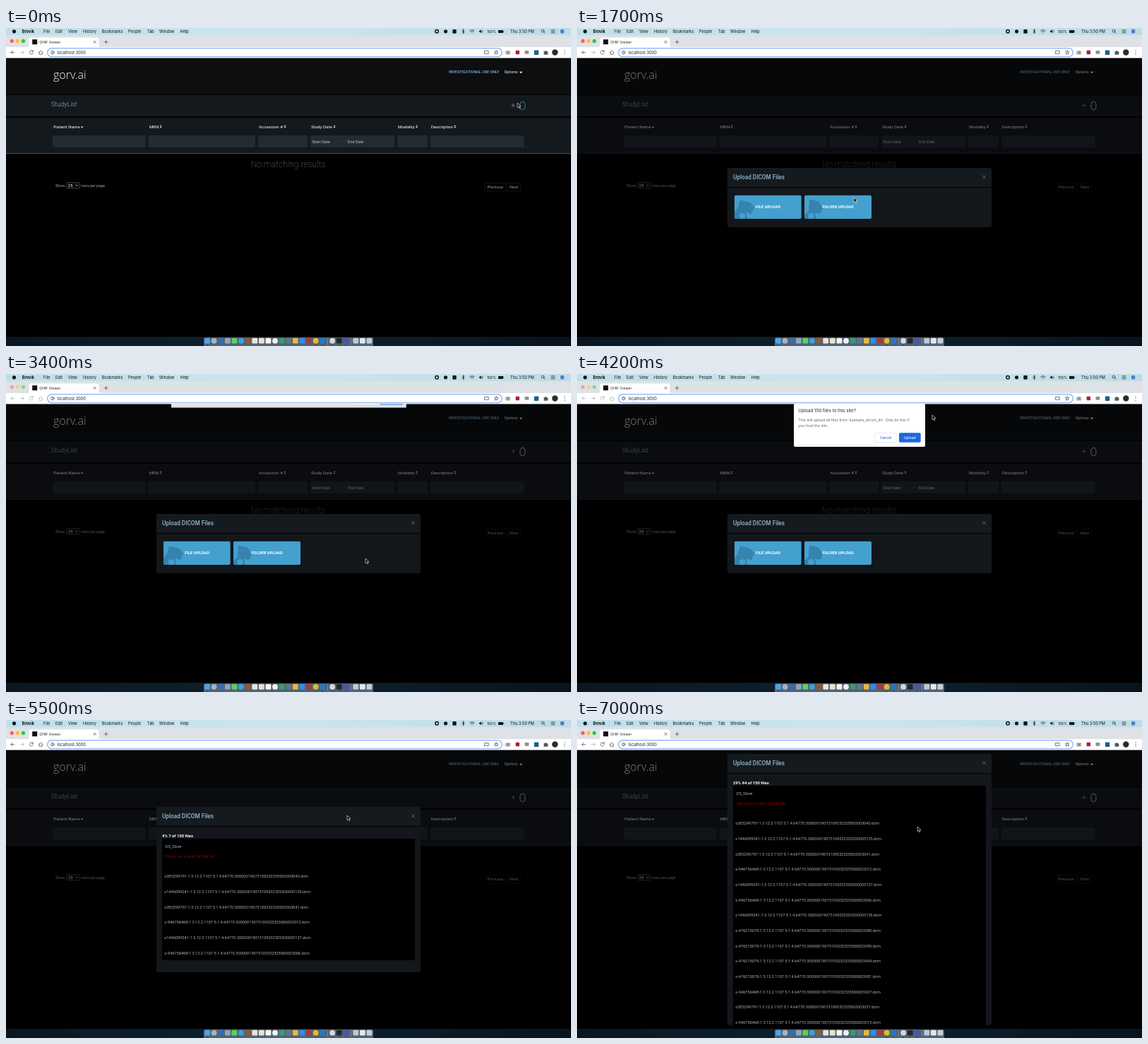
These frames come from a looping animation (800x450 px, 7100 ms). An HTML page:

```html
<!DOCTYPE html>
<html lang="en">
<head>
<meta charset="utf-8">
<title>Study upload</title>
<style>
html, body { margin: 0; width: 100%; height: 100%; overflow: hidden; background: #000; }
svg { display: block; }
#stage { width: 800px; height: 450px; }
text { font-family: Roboto, sans-serif; font-size: 6.2px; fill: #fff; white-space: pre; }
.mac text { font-family: Inter, sans-serif; font-size: 5.3px; fill: #222; }
.mac .menu text { font-size: 5.6px; fill: #111; }
.mac .side { font-weight: 600; font-size: 4.8px; fill: #77777b; }
.mac .faint text { font-size: 5.2px; fill: #b4b4b4; }
.mid { text-anchor: middle; }
.line { fill: none; stroke-linecap: round; stroke-linejoin: round; }

#dim, #modal, .pre, .post, .busy, #sheet, #ask, #cursor, #arrow, #resize {
  animation: 7.1s linear infinite;
}
#dim, #modal { animation-name: fade; }
.pre { animation-name: before; animation-timing-function: step-end; }
.post { animation-name: after; animation-timing-function: step-end; }
.busy { animation-name: busy; animation-timing-function: step-end; }
#sheet { animation-name: slide; }
#ask { animation-name: ask; animation-timing-function: step-end; }
#cursor { animation-name: move; animation-timing-function: ease-in-out; }
#arrow { animation-name: arrow; animation-timing-function: step-end; }
#resize { animation-name: resize; animation-timing-function: step-end; }

@keyframes fade { 0%, 7.04% { opacity: 0 } 8.45%, 100% { opacity: 1 } }
@keyframes before { 0% { opacity: 1 } 7.04%, 100% { opacity: 0 } }
@keyframes after { 0% { opacity: 0 } 7.04%, 100% { opacity: 1 } }
@keyframes busy { 0% { opacity: 1 } 28.17% { opacity: .45 } 64.79%, 100% { opacity: 1 } }
@keyframes slide {
  0%, 28.17% { transform: translateY(-190px); animation-timing-function: ease-out }
  32.4%, 45.07% { transform: none }
  48.06%, 100% { transform: translateY(-190px) }
}
@keyframes ask { 0% { opacity: 0 } 53.5% { opacity: 1 } 64.79%, 100% { opacity: 0 } }
@keyframes move {
  0%, 1.4% { transform: translate(724px, 106px) }
  4%, 8.5% { transform: translate(718px, 109px) }
  21.1%, 28.2% { transform: translate(392px, 240px) }
  36.6%, 38.8% { transform: translate(566px, 226px) }
  42.5%, 45.07% { transform: translate(545px, 219px) }
  47.89%, 51.5% { transform: translate(509px, 261px) }
  57.5%, 59.3% { transform: translate(503px, 58px) }
  62.7%, 65.5% { transform: translate(473px, 89px) }
  73.2%, 77.5% { transform: translate(483px, 135px) }
  84%, 100% { transform: translate(482px, 151px) }
}
@keyframes arrow { 0% { opacity: 1 } 36.5% { opacity: 0 } 39%, 100% { opacity: 1 } }
@keyframes resize { 0% { opacity: 0 } 36.5% { opacity: 1 } 39%, 100% { opacity: 0 } }
</style>
</head>
<body>
<svg id="stage" viewBox="0 0 800 450">
  <defs>
    <linearGradient id="sky"><stop stop-color="#bfdfea"/><stop offset=".5" stop-color="#cbe5ee"/><stop offset="1" stop-color="#bedce8"/></linearGradient>
    <linearGradient id="sea"><stop stop-color="#0a1722"/><stop offset=".5" stop-color="#0d2231"/><stop offset="1" stop-color="#08141d"/></linearGradient>
    <path id="sort" d="M-1.5 -.4L0 -2.1L1.5 -.4ZM-1.5 .4L0 2.1L1.5 .4Z" fill="#fff"/>
    <clipPath id="tile"><rect width="95" height="33.5" rx="2.5"/></clipPath>
  </defs>

  <rect width="800" height="450"/>

  <g id="page">
    <rect y="42" width="800" height="52" fill="#0c0e10"/>
    <rect y="95" width="800" height="30" fill="#14191e"/>
    <rect y="127" width="800" height="50" fill="#14191e"/>
    <rect y="177" width="800" height="1" fill="#112a3c"/>
    <rect class="pre" y="177" width="800" height="1" fill="#28567f"/>
    <text x="67" y="72" style="font: 300 16px 'Open Sans', sans-serif">gorv.ai</text>
    <text x="627" y="64.3" style="font-size:5.4px;font-weight:500;fill:#84b4d8">INVESTIGATIONAL USE ONLY</text>
    <text x="705.5" y="64.3" style="font-size:5.5px">Options</text>
    <path d="M727 61.8h4.4l-2.2 2.5z" fill="#fff"/>
    <text x="64" y="111" style="font-size:9px;font-weight:300;fill:#9bb2be">StudyList</text>
    <path d="M715.7 109.5h5M718.2 107v5" class="line" stroke="#8b969d" stroke-width=".7"/>
    <g class="line" stroke-width=".9">
      <rect class="pre" x="727.9" y="104.3" width="7" height="11.4" rx="3.5" stroke="#3d86a8"/>
      <rect class="post" x="727.9" y="104.3" width="7" height="11.4" rx="3.5" stroke="#bcc3c7"/>
    </g>
    <g id="filters"></g>
    <path class="pre" d="M106 139.4h3.4l-1.7 2z" fill="#fff"/>
    <path class="post" d="M106 141h3.4l-1.7-2z" fill="#fff"/>
    <text x="433.5" y="162.5" style="font-size:5.6px;fill:#c5cbd0">Start Date</text>
    <text x="484" y="162.5" style="font-size:5.6px;fill:#c5cbd0">End Date</text>
    <path d="M473 160.5h8" stroke="#39434b" stroke-width=".6"/>
    <text x="399.5" y="197" class="mid" style="font-size:12.1px;font-weight:200;fill:#858585">No matching results</text>
    <text x="70" y="225" style="font-size:5.5px;fill:#a3a3a3">Show</text>
    <rect x="86" y="218.8" width="18" height="8" rx="1" fill="#050505" stroke="#888" stroke-width=".5"/>
    <text x="88" y="225" style="font-size:5.8px">25</text>
    <path d="M98.5 222l1.5 1.6 1.5-1.6" class="line" stroke="#fff" stroke-width=".7"/>
    <text x="106" y="225" style="font-size:5.4px;fill:#a3a3a3">rows per page</text>
    <path d="M678.5 219.5h29.5v11.5h-29.5zM710 219.5h18.5v11.5H710z" class="line" stroke="#1d1d1d" stroke-width=".6"/>
    <text x="692.8" y="227.3" class="mid" style="font-size:5.9px;fill:#999">Previous</text>
    <text x="719.2" y="227.3" class="mid" style="font-size:5.9px;fill:#999">Next</text>
  </g>

  <rect id="dim" y="42" width="800" height="395" fill-opacity=".5"/>

  <g id="modal">
    <rect id="panel" x="213" width="374" rx="3" fill="#13171b"/>
    <g id="head">
      <path d="M213 27V3q0-3 3-3h368q3 0 3 3v24z" fill="#151a1f"/>
      <path d="M213 27.4h374" stroke="#020303"/>
      <text x="221" y="16.2" style="font-size:8.2px;font-weight:500;fill:#91b9cd">Upload DICOM Files</text>
      <path d="M574.4 10.8l4.2 4.2m0-4.2l-4.2 4.2" class="line" stroke="#8b959c" stroke-width=".6"/>
    </g>
    <g id="choose">
      <g transform="translate(222.8 236.6)" clip-path="url(#tile)">
        <rect width="95" height="33.5" fill="#44a0cf"/>
        <path d="M8 7L22 10L28 17L24 27L17 24L18 34H0V24L5 18Z" fill="#3583ae"/>
        <path d="M7 27l5-2 4 3-2 6h-6z" fill="#44a0cf"/>
      </g>
      <g transform="translate(322 236.6)" clip-path="url(#tile)">
        <rect width="95" height="33.5" fill="#44a0cf"/>
        <path d="M7 6L20 9L26 18L23 26L15 25L17 34H0V28L6 22Z" fill="#3583ae"/>
        <path d="M5 27l5-2 4 3-2 6h-6z" fill="#44a0cf"/>
      </g>
      <text x="270.5" y="255.4" class="mid" style="font-size:5.8px;font-weight:700">FILE UPLOAD</text>
      <text x="369.5" y="255.4" class="mid" style="font-size:5.8px;font-weight:700">FOLDER UPLOAD</text>
    </g>
    <g id="progress">
      <text id="count" x="221" y="43" style="font-size:5.9px;font-weight:700"></text>
      <svg id="list" x="221" y="45" width="358" height="0"><rect width="358" height="400"/></svg>
    </g>
  </g>

  <g id="sheet" class="mac">
    <rect x="234" y="42" width="332.5" height="185.3" fill="#e2e2e2"/>
    <rect x="234" y="58" width="64" height="152" fill="#cdcdcf"/>
    <rect x="299" y="58" width="267.5" height="152" fill="#fff"/>
    <path d="M234 58h332.5M234 210.3h332.5" stroke="#bcbcbc" stroke-width=".6"/>
    <path d="M378.7 58v152M463.5 58v152M469.5 58v152M549 58v152M554.5 58v152" stroke="#e3e3e3" stroke-width=".6"/>
    <rect x="379.4" y="59.5" width="3.4" height="34" rx="1.7" fill="#bdbdbd"/>
    <rect x="293.6" y="59.5" width="3.4" height="124" rx="1.7" fill="#939397"/>
    <g fill="#f8f8f8" stroke="#c4c4c4" stroke-width=".5">
      <path d="M238.5 44.5h21v9.5h-21zM263 44.5h19v9.5h-19zM284 44.5h18v9.5h-18zM357 44.5h87v9.5h-87zM471 44.5h91.5v9.5H471z"/>
    </g>
    <path d="M249 44.5v9.5" stroke="#ddd" stroke-width=".5"/>
    <path d="M244.5 47l-2 2.3 2 2.3M253.5 47l2 2.3-2 2.3M266 47.2h7v4.2h-7zM268.3 47.2v4.2M270.6 47.2v4.2M276 48.6l1.3 1.4 1.3-1.4M289.5 47h3l1 1h3v3.8h-7zM438 48.4l1.5-1.7 1.5 1.7M438 50.2l1.5 1.7 1.5-1.7" class="line" stroke="#666" stroke-width=".7"/>
    <circle cx="475.7" cy="48.7" r="1.7" class="line" stroke="#777" stroke-width=".6"/><path d="M477 50l1.3 1.5" stroke="#777" stroke-width=".6"/>
    <path d="M360 46.4h2.5l.8 1h3.5v4.8H360zM301.5 69.6h2.5l.8 1h3.5v4.8h-6.8z" fill="#5cb8ec"/>
    <text x="368.3" y="51.5">example_dicom_dir</text>
    <text x="480.5" y="51.5" style="fill:#8c8c8c">Search</text>
    <text x="301" y="65" style="font-size:4.8px;font-weight:500">Today</text>
    <text x="309.5" y="74.3">untitled folder</text>
    <path d="M374.5 70.5l2.6 1.8-2.6 1.8z" fill="#555"/>
    <path d="M299 67.2h79M299 78h79" stroke="#e6e6e6" stroke-width=".4"/>
    <text x="301" y="84.3" style="font-size:4.8px;font-weight:500">2019</text>
    <g id="files" class="faint"></g>
    <g id="side"></g>
    <rect x="234" y="210.6" width="332.5" height="16.7" fill="#e2e2e2"/>
    <rect x="493" y="214.5" width="32.5" height="9" rx="1.8" fill="#fff" stroke="#c0c0c0" stroke-width=".5"/>
    <rect x="529" y="214.5" width="33.5" height="9" rx="1.8" fill="#2674f2"/>
    <text x="509.2" y="220.9" class="mid">Cancel</text>
    <text x="545.7" y="220.9" class="mid" style="fill:#fff">Upload</text>
  </g>

  <g id="browser" class="mac">
    <rect width="800" height="10.5" fill="url(#sky)"/>
    <rect y="10" width="800" height="17.5" fill="#dee1e6"/>
    <rect y="27" width="800" height="15.5" fill="#fff"/>
    <path d="M30 27q2.5 0 2.5-3v-7.5q0-3 3-3h93q3 0 3 3V24q0 3 2.5 3z" fill="#fff"/>
    <g class="busy"><circle cx="8.3" cy="18.4" r="2.6" fill="#fc5b57"/><circle cx="16.4" cy="18.4" r="2.6" fill="#fdbc2e"/><circle cx="24.5" cy="18.4" r="2.6" fill="#28c840"/></g>
    <rect x="37.2" y="16.2" width="7" height="7" fill="#111"/>
    <text x="47.3" y="21.8" style="font-size:5.1px">OHIF Viewer</text>
    <path d="M124 18.2l3.2 3.2m0-3.2l-3.2 3.2M139.2 19.8h5M141.7 17.3v5" class="line" stroke="#444" stroke-width=".7"/>
    <rect x="58.7" y="28.7" width="643.6" height="12" rx="6" fill="#fff" stroke="#6aa2f0" stroke-width="1.1"/>
    <text x="72.5" y="36.6" style="font-size:5.7px">localhost:3000</text>
    <g class="line" stroke="#54585c" stroke-width=".8">
      <path class="busy" d="M12 34.5H7m2.2-2.3L7 34.5l2.2 2.3M38 32.8a2.6 2.6 0 1 0 .4 2.3M38.3 31.5v1.8h-1.8M46.2 34.7l3-2.7 3 2.7M47.2 34.3v3h4v-3"/>
      <path d="M677.8 32.6h5.4v3.8h-5.4zM694.2 31.8l.8 1.9 2 .1-1.6 1.3.6 2-1.8-1.1-1.8 1.1.6-2-1.6-1.3 2-.1zM708.3 33h5v3.8h-5z"/>
      <path d="M20.5 34.5h5m-2.2-2.3l2.2 2.3-2.2 2.3" stroke="#b5b8bb"/>
      <circle cx="65.9" cy="34.6" r="2.3"/><path d="M65.9 34.4v1.2M65.9 33.3v.1"/>
    </g>
    <circle cx="710.8" cy="34.8" r="1.2" fill="#54585c"/>
    <rect x="721.6" y="31.8" width="5.4" height="5.4" rx="1" fill="#b0202c"/>
    <rect x="734.5" y="32" width="5.8" height="4.8" rx=".8" fill="#8a9096"/>
    <rect x="747.8" y="31.5" width="6.4" height="6.4" rx=".6" fill="#20608c"/>
    <path d="M761.6 33h1.6a1 1 0 0 1 2 0h1.6v1.4a1 1 0 0 1 0 2v1.3h-5.2z" fill="#54585c"/>
    <circle cx="777.3" cy="34.5" r="4.2" fill="#2e2a2b"/>
    <path d="M791 31.6v.1M791 34.4v.1M791 37.2v.1" class="line" stroke="#54585c" stroke-width="1.2"/>
    <circle cx="11.5" cy="4.8" r="2.6" fill="#111"/>
    <g id="menu" class="menu"></g>
    <g fill="#161616">
      <circle cx="610" cy="4.8" r="3"/><circle cx="622.5" cy="4.8" r="2.6"/>
      <rect x="632.3" y="2" width="5.4" height="5.8" rx="1.2"/>
      <path d="M670 3.8h1.4l1.7-1.5v5l-1.7-1.5H670zM697 2.9h7v4h-7zM704.4 4.2h.8v1.4h-.8z"/>
      <rect x="785" y="2" width="5.2" height="5.4" rx="1.4" fill="#4d7fc5"/>
    </g>
    <rect x="608.8" y="3.6" width="2.4" height="2.4" fill="#fff"/>
    <path d="M647.5 2v5.6M645.9 3.5l3.2 2.6-1.6 1.5M645.9 6.1l3.2-2.6-1.6-1.5M656.7 3.8q3.2-2.7 6.4 0M658 5.2q1.9-1.5 3.8 0M659.9 6.8v.1M674.6 3.2q1.2 1.6 0 3.3M761.5 5.6l1.7 1.8M772 2.8h5M772 4.8h5M772 6.8h5" class="line" stroke="#222" stroke-width=".7"/>
    <circle cx="760" cy="4.2" r="1.9" class="line" stroke="#222" stroke-width=".7"/>
  </g>

  <g id="ask" class="mac">
    <rect x="307" y="42" width="186" height="61" rx="2" fill="#fff"/>
    <text x="313.3" y="54" style="font-size:6.2px">Upload 150 files to this site?</text>
    <text x="313.3" y="66.6" style="font-size:5.2px;fill:#5f6368">This will upload all files from 'example_dicom_dir'. Only do this if</text>
    <text x="313.3" y="74.6" style="font-size:5.2px;fill:#5f6368">you trust the site.</text>
    <rect x="421.8" y="83.5" width="30.5" height="13" rx="1.7" fill="#fff" stroke="#dadce0" stroke-width=".6"/>
    <rect x="456" y="83.3" width="30.7" height="13.4" rx="1.7" fill="#1a68dc"/>
    <text x="437" y="91.8" class="mid" style="font-size:4.9px;font-weight:500;fill:#1a68dc">Cancel</text>
    <text x="471.3" y="91.8" class="mid" style="font-size:4.9px;font-weight:500;fill:#fff">Upload</text>
  </g>

  <g id="dock">
    <rect y="437" width="800" height="13" fill="url(#sea)"/>
    <path d="M280 450v-10q0-2 2-2h236q2 0 2 2v10z" fill="#506274"/>
    <path d="M455.3 439v9M488.3 439v9" stroke="#aab6be" stroke-width=".5"/>
  </g>

  <g id="cursor">
    <path id="arrow" d="M0 0V6.6L1.6 5.2L2.7 7.7L3.9 7.2L2.8 4.7H4.9Z" fill="#000" stroke="#fff" stroke-width=".6"/>
    <path id="resize" d="M-2.6 -2.6h2.6l-.8.8 2.6 2.6.8-.8v2.6H0l.8-.8-2.6-2.6-.8.8z" fill="#000" stroke="#fff" stroke-width=".5"/>
  </g>
</svg>
<script>
const $ = id => document.getElementById(id);
const add = (id, html) => $(id).insertAdjacentHTML('beforeend', html);
const label = (x, y, s, attrs = '') => `<text x="${x}" y="${y}" ${attrs}>${s}</text>`;

// label, text x, field x, field width, sort arrow x
[['Patient Name', 67.3, 66, 131.5], ['MRN', 202.7, 201.5, 151.5, 219], ['Accession #', 358, 357, 70, 395],
 ['Study Date', 432, 431, 119, 465], ['Modality', 555, 554, 43, 581.5], ['Description', 601.7, 601, 132.5, 635.7]]
  .forEach(([s, x, fx, w, ax]) => add('filters', label(x, 141.5, s) +
    `<rect x="${fx}" y="152" width="${w}" height="17" rx="1.5" fill="#222b32"/>` +
    (ax ? `<use href="#sort" x="${ax}" y="139.5"/>` : '')));

Object.entries({ Brovik: 22.7, File: 53, Edit: 70, View: 88, History: 109, Bookmarks: 135.7, People: 173,
  Tab: 200, Window: 217, Help: 246.5, 'Thu 3:50 PM': 714 })
  .forEach(([s, x], i) => add('menu', label(x, 6.8, s, i ? '' : 'font-weight="700"')));
add('menu', label(681, 6.7, '100%', 'style="font-size:4.9px"'));

// sidebar: headings, then entries with an icon or a tag colour
[['Favourites', 66.2], ['Fogbin', 132.6], ['Tags', 155.2]].forEach(([s, y]) => add('side', label(237.3, y, s, 'class="side"')));
['Recents', 'Applications', 'Desktop', 'Documents', 'Downloads'].forEach((s, i) => side(s, 74 + i * 10.8));
side('Fogbin Drive', 140);
[['coldriver', '#b4b4b6'], ['Red', '#fc4b48'], ['Orange', '#fd9a28'], ['Yellow', '#fdcb2e'], ['Green', '#35c84a']]
  .forEach(([s, c], i) => side(s, 163 + i * 10.8, c));
function side(s, y, tag) {
  add('side', label(250.3, y + 2, s) + (tag
    ? `<circle cx="244.7" cy="${y}" r="2.4" fill="${tag}" stroke="#0003" stroke-width=".4"/>`
    : `<rect x="242" y="${y - 2.3}" width="5.6" height="4.8" rx="1.2" class="line" stroke="#4c4c50" stroke-width=".8"/><path d="M243.7 ${y}h2.2" stroke="#4c4c50" stroke-width=".7"/>`));
}

for (let i = 0; i < 16; i++) {
  const y = 92.8 + i * 7.56;
  add('files', `<rect x="302.3" y="${y - 4.6}" width="4.6" height="5.4" rx=".5" fill="#ddd"/><path d="M303.2 ${y - 1.6}h2.8" stroke="#aaa" stroke-width="1.6"/>` +
    label(309.3, y, `s-4762150...030${70 + i + (i > 0)}.dcm`));
}

const ROW = 21.68;
const series = { a: 's283299797', b: 's1446099241', c: 's-946756468', d: 's-476215079' };
const light = 'style="font-size:5.73px;font-weight:300"';
add('list', label(3.3, 13.2, '.DS_Store', light) +
  label(3.3, 27.4, 'This is not a valid DICOM file', 'style="font-size:5.6px;fill:#8e0000"'));
'a040 b125 a041 c012 b127 c006 b126 d080 d095 d094 d081 c007 a037 c013'.split(' ').forEach((f, i) =>
  add('list', label(3.3, 55.3 + i * ROW, `${series[f[0]]}-1.3.12.2.1107.5.1.4.64770.30000019073109232325500003${f.slice(1)}.dcm`, light)));

const icons = '#4aa5ea #a9b2ba #2f6fb4 #8ea6b8 #54d45c #3fa0dc #8a5a32 #e9e4e0 #e8e3c8 #f4f4f0 #eef0f2 #3d9a68 #5f7688 #e8b83c #2b8ef0 #a83a38 #e4b830 #2878c0 #d6d8da #25282c #4b55a8 #b9cbd8 #e4e7ea #c9ced2'.split(' ');
icons.forEach((c, i) => {
  const x = 285 + i * 9.6 + (i > 17) * 4.3 + (i > 20) * 4.3;
  const round = [1, 2, 5, 10, 16, 18].includes(i);
  add('dock', `<rect x="${x - 3.9}" y="438.8" width="7.8" height="7.8" rx="${round ? 3.9 : 1.5}" fill="${c}"/>` +
    (i === 0 || (i > 15 && i < 21) ? `<circle cx="${x}" cy="448.8" r=".6" fill="#111"/>` : ''));
});

const LOOP = 7100, SWITCH = 5000, TOTAL = 150;
let start;
function draw(now) {
  start ??= now;
  const t = (now - start) % LOOP;
  const loading = t >= SWITCH;
  const n = Math.max(0, Math.floor(7 + (t - 5490) * 0.02467));
  const rows = n ? 42 + (n - 1) * ROW : 0;
  const height = loading ? Math.min(384, 62 + rows) : 84;
  const top = 240 - height / 2;
  $('panel').setAttribute('y', top);
  $('panel').setAttribute('height', height);
  $('head').setAttribute('transform', `translate(0 ${top})`);
  $('choose').style.display = loading ? 'none' : '';
  $('progress').style.display = loading ? '' : 'none';
  $('progress').setAttribute('transform', `translate(0 ${top})`);
  $('list').setAttribute('height', Math.min(rows, 387 - top));
  $('count').textContent = `${Math.floor(n / TOTAL * 100)}% ${n} of ${TOTAL} files`;
  requestAnimationFrame(draw);
}
requestAnimationFrame(draw);
</script>
</body>
</html>
```
